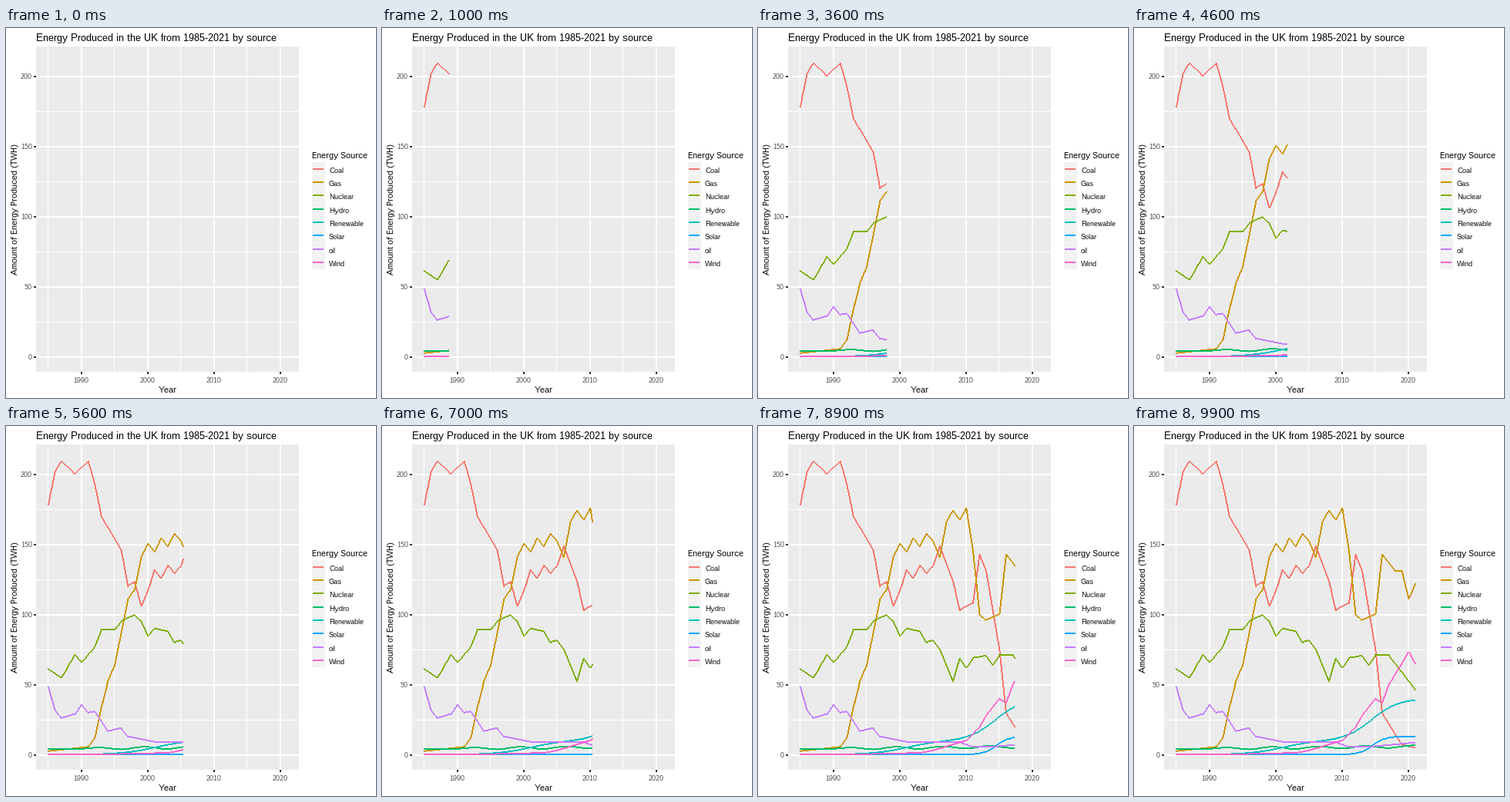
Write a matplotlib script that moves like this. It is 480x480 px and loops after 10 s.

```python
import matplotlib.pyplot as plt
import numpy as np
from matplotlib.animation import FuncAnimation
from matplotlib.colors import to_rgb
from matplotlib.patches import Rectangle

SIZE, DPI = 480, 72
FRAMES, INTERVAL = 100, 100
START, SPAN = 1985, 36
K = np.arange(SPAN + 1)  # years since START

plt.rcParams.update({
    "font.family": "Liberation Sans",
    "text.hinting": "native",
    "text.hinting_factor": 1,
})


def trend(*points):
    """Straight runs between (year since START, value) turning points."""
    return np.interp(K, *zip(*points))


def zigzag(first, last, size):
    """Alternate up and down, up on even years when size is positive."""
    return np.where((K >= first) & (K <= last), size * (-1.0) ** K, 0)


def logistic(top, middle, width):
    return top / (1 + np.exp((middle - K) / width))


coal = trend((0, 178), (1, 202), (2, 209.7), (4, 200), (6, 209.7), (7, 193),
             (8, 170), (11, 146), (12, 120), (13, 123), (14, 106), (16, 128),
             (20, 135), (21, 149), (23, 124), (24, 103), (26, 108), (27, 143),
             (28, 131), (30, 75), (31, 30), (34, 7), (36, 5))
gas = trend((0, 2.5), (6, 5.5), (7, 12), (8, 34), (9, 53), (10, 64),
            (12, 111), (13, 118), (14, 145), (20, 156), (21, 137), (22, 170),
            (25, 172), (26, 146), (27, 100), (28, 96), (30, 100), (31, 143),
            (33, 131), (34, 131), (35, 111), (36, 122))
nuclear = trend((0, 61), (2, 55), (4, 71.5), (5, 66), (7, 77), (8, 89),
                (10, 89), (11, 95), (13, 99.5), (14, 95), (15, 85), (16, 90),
                (18, 88), (19, 80), (20, 81.5), (21, 75.5), (23, 52.5),
                (24, 69), (25, 62), (26, 69), (28, 70.5), (29, 64), (30, 71),
                (32, 71), (36, 46.5))
oil = trend((0, 48.5), (1, 32), (2, 26), (4, 29), (5, 36), (6, 30), (7, 30.7),
            (9, 16.7), (11, 19), (12, 13), (16, 9.2), (24, 9), (26, 5.5),
            (29, 5.5), (36, 8.6))
wind = trend((0, 0), (7, 0), (15, 0.9), (18, 1.2), (20, 2.9), (25, 10),
             (27, 20), (28, 28), (30, 40), (31, 37), (32, 50), (35, 73.5),
             (36, 65))
ripple = 0.08 * np.minimum(K, 11) * np.cos(2 * np.pi * (K - 11) / 7)

SERIES = {
    "Coal": ("#F8766D", coal + zigzag(16, 19, 4)),
    "Gas": ("#CD9600", gas + zigzag(14, 25, -3.8)),
    "Nuclear": ("#7CAE00", nuclear),
    "Hydro": ("#00BE67", 4.1 + 0.045 * K - ripple),
    "Renewable": ("#00BFC4", logistic(10, 16, 2.5) + logistic(30, 29.5, 2)),
    "Solar": ("#00A9FF", logistic(13, 29.6, 0.95)),
    "oil": ("#C77CFF", oil),
    "Wind": ("#FF61CC", wind),
}


def px(k):
    return 54.45 + 8.614 * k


def py(value):
    return 426.8 - 1.82 * value


# frame at which each year's point is reached
STOPS = [round(k * (FRAMES - 1) / SPAN) for k in range(SPAN + 1)]

fig = plt.figure(figsize=(SIZE / DPI, SIZE / DPI), dpi=DPI, facecolor="white")
ax = fig.add_axes([0, 0, 1, 1])
ax.axis("off")


def box(x, y, w, h, color):
    ax.add_patch(Rectangle((x, y), w, h, fc=color, lw=0, antialiased=False))


def label(x, y, text, size, color="black", **kw):
    ax.text(x, y, text, fontsize=size, color=color, **kw)


box(39, 24, 341, 422, "#EBEBEB")
for k in range(0, SPAN, 5):
    x, major = int(px(k)), k % 10 == 5
    box(x, 24, 1 + major, 422, "white")
    if major:
        box(x, 446, 2, 3, "#333333")
        label(x + 0.5, 460, str(START + k), 9, "#4D4D4D", ha="center")
for value in range(0, 201, 25):
    y, major = int(py(value)), value % 50 == 0
    box(39, y, 341, 1 + major, "white")
    if major:
        box(36, y, 3, 2, "#333333")
        label(34, y + 4, str(value), 9, "#4D4D4D", ha="right")

label(39, 17, "Energy Produced in the UK from 1985-2021 by source", 13)
label(210, 473, "Year", 11, ha="center")
label(15, 235, "Amount of Energy Produced (TWH)", 11, rotation=90,
      ha="center", va="baseline", rotation_mode="anchor")
label(397, 169, "Energy Source", 11)

box(397, 174, 17, 139, "#F2F2F2")
for i, (name, (color, _)) in enumerate(SERIES.items()):
    y = round(182.9 + 17.28 * i)
    box(398, y - 1, 14, 2, color)
    label(419, y + 5, name, 9)

canvas = np.zeros((SIZE, SIZE, 4))
layer = ax.imshow(canvas, extent=(0, SIZE, SIZE, 0), aspect="auto",
                  interpolation="nearest", zorder=4)
ax.set(xlim=(0, SIZE), ylim=(SIZE, 0))


def trace(xs, ys, color):
    """Hard-edged polyline, two pixels thick across its main direction."""
    rgba = (*to_rgb(color), 1)
    for x0, y0, x1, y1 in zip(xs, ys, xs[1:], ys[1:]):
        width, height = abs(x1 - x0), abs(y1 - y0)
        steps = int(np.ceil(max(width, height))) + 1
        cols = np.linspace(x0, x1, steps).astype(int)
        rows = np.linspace(y0, y1, steps).astype(int)
        canvas[rows, cols] = rgba
        if width >= height:
            canvas[rows - 1, cols] = rgba
        else:
            canvas[rows, cols + 1] = rgba


def draw(frame):
    canvas[:] = 0
    now = np.interp(frame, STOPS, K)
    ks = np.append(K[K < now], now)
    for color, values in SERIES.values():
        trace(px(ks), py(np.interp(ks, K, values)), color)
    layer.set_data(canvas)
    return [layer]


anim = FuncAnimation(fig, draw, frames=FRAMES, interval=INTERVAL,
                     init_func=lambda: draw(0), repeat=True, repeat_delay=0)
plt.show()
```
